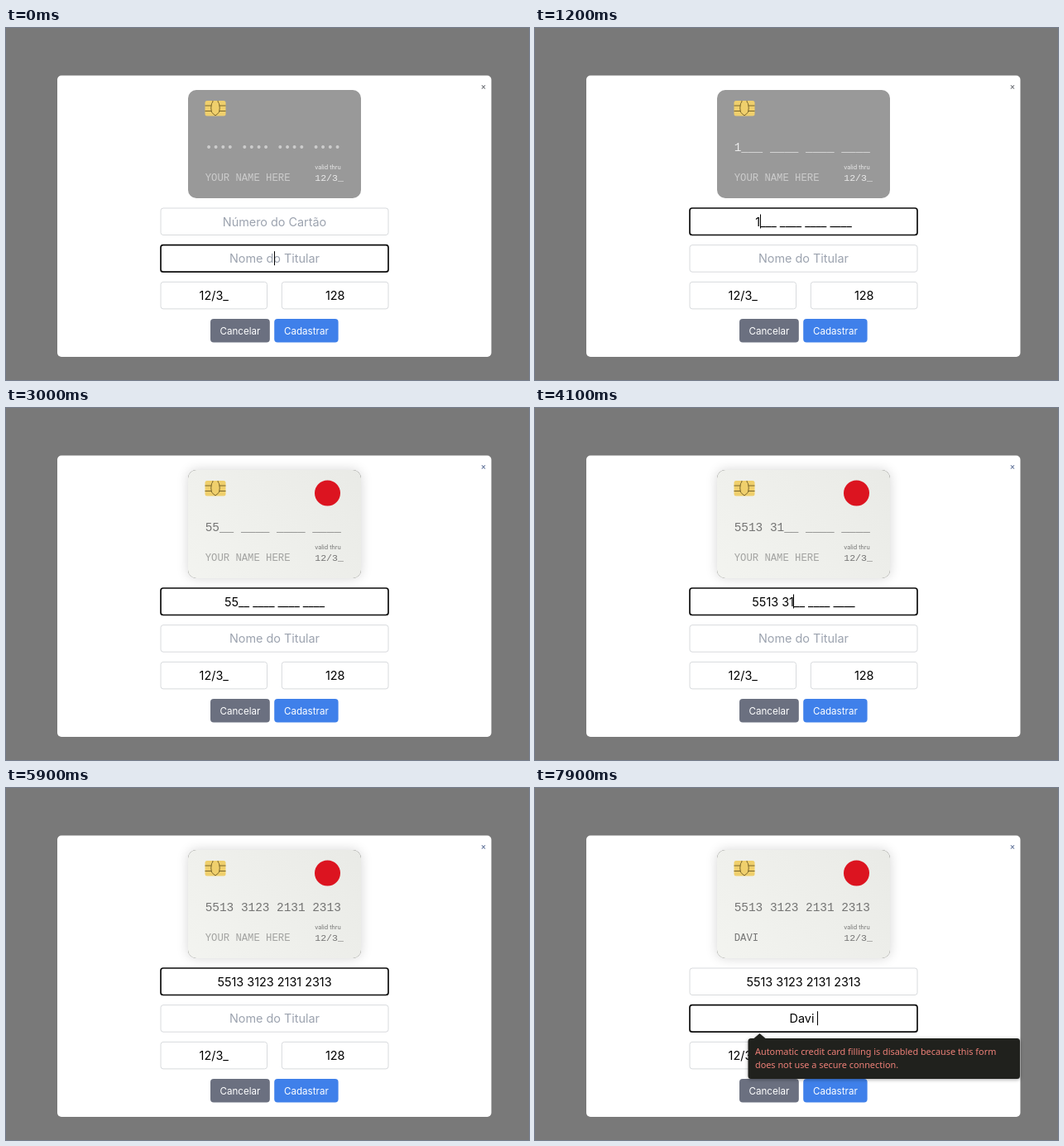
Recreate the animation shown at these times as an HTML page with a canvas. Size 632 px wide and 426 px high, loop 8 s.

```html
<!DOCTYPE html>
<html lang="pt">
<head>
<meta charset="utf-8">
<title>Cadastro de cartão</title>
<style>
  html, body { margin: 0; width: 100%; height: 100%; overflow: hidden; background: #797979; }
  canvas { display: block; }
</style>
</head>
<body>
<canvas id="stage" width="632" height="426"></canvas>
<script>
const ctx = document.getElementById('stage').getContext('2d');
const LOOP = 8000, STEP = 100, BLINK = 600;
const SANS = 'Inter, sans-serif';
const MONO = '"Liberation Mono", monospace';
const INPUT_FONT = '14.4px ' + SANS;
const CARD = { x: 220, y: 75, w: 209, h: 131, r: 10 };
const MASK = '____ ____ ____ ____';
const DIGITS = '5513312321312313';
const HOLDER = 'Davi ';

// [time, value]
const NUMBER_KEYS = [[300, ''], [1000, '1'], [1700, '']].concat(
  [[2200, 1], [2300, 2], [3200, 3], [3500, 4], [3900, 5], [4100, 6], [4300, 8], [4400, 9],
   [4700, 10], [4800, 12], [4900, 13], [5000, 14], [5100, 15], [5300, 16]]
    .map(([t, n]) => [t, DIGITS.slice(0, n)]));
const NAME_KEYS = [[6000, 0], [6800, 1], [7000, 2], [7100, 3], [7300, 4], [7800, 5]]
  .map(([t, n]) => [t, HOLDER.slice(0, n)]);
const BRAND_AT = 2320, BRAND_TIME = 500, POPUP_AT = 6900;

const lastKey = (keys, t) => keys.filter(k => k[0] <= t).pop();

function groups(digits) {
  return digits.replace(/(.{4})(?=.)/g, '$1 ');
}

function box(x, y, w, h, r) {
  ctx.beginPath();
  ctx.roundRect(x, y, w, h, r);
}

function fillBox(x, y, w, h, r, color) {
  box(x, y, w, h, r);
  ctx.fillStyle = color;
  ctx.fill();
}

function text(str, x, y, font, color, align = 'left') {
  ctx.font = font;
  ctx.fillStyle = color;
  ctx.textAlign = align;
  ctx.fillText(str, x, y);
}

function shadow(color, blur, y = 0) {
  ctx.shadowColor = color;
  ctx.shadowBlur = blur;
  ctx.shadowOffsetY = y;
}

function input(x, y, w, { value = '', placeholder = '', focused = false, caret = null }) {
  box(x, y, w, 32.5, 3);
  ctx.fillStyle = '#fff';
  ctx.fill();
  ctx.strokeStyle = focused ? '#0c0c0c' : '#d4d6da';
  ctx.lineWidth = focused ? 1.7 : 0.9;
  ctx.stroke();
  const mid = x + w / 2;
  ctx.font = INPUT_FONT;
  const left = mid - ctx.measureText(value).width / 2;
  if (value) text(value, left, y + 21.5, INPUT_FONT, '#000');
  else text(placeholder, mid, y + 21.5, INPUT_FONT, '#9ca3af', 'center');
  if (caret !== null) {
    const at = left + ctx.measureText(value.slice(0, caret)).width;
    ctx.fillStyle = '#000';
    ctx.fillRect(Math.floor(at), y + 7.5, 1, 17);
  }
}

function button(label, x, w, color) {
  fillBox(x, 352, w, 28.5, 4, color);
  text(label, x + w / 2, 370.5, '11.6px ' + SANS, '#fff', 'center');
}

function chip() {
  fillBox(240.5, 88, 25, 18.5, 2.5, '#efcf6c');
  ctx.strokeStyle = '#6d5a24';
  ctx.lineWidth = 0.9;
  ctx.beginPath();
  for (const side of [-1, 1]) {
    const edge = 253 + side * 12.5, inner = 253 + side * 5;
    for (const y of [94, 100.5]) {
      ctx.moveTo(edge, y);
      ctx.lineTo(inner, y);
    }
    ctx.moveTo(253 + side * 3, 88);
    ctx.quadraticCurveTo(253 + side * 3, 90, 253 + side * 4.5, 91.5);
    ctx.quadraticCurveTo(253 + side * 6, 97, 253 + side * 4.5, 102);
    ctx.quadraticCurveTo(253 + side * 2, 104.5, 253, 106);
  }
  ctx.stroke();
}

function cardBackground(t) {
  const { x, y, w, h, r } = CARD;
  if (t < BRAND_AT) return fillBox(x, y, w, h, r, '#999');

  ctx.save();
  shadow('rgba(0,0,0,.17)', 14);
  fillBox(x, y, w, h, r, '#82827e');
  shadow('transparent', 0);
  box(x, y, w, h, r);
  ctx.clip();
  const base = ctx.createLinearGradient(x + 72, y + h, x + 137, y);
  base.addColorStop(0, '#8a8a86');
  base.addColorStop(1, '#737470');
  ctx.fillStyle = base;
  ctx.fillRect(x, y, w, h);

  // A tilted sheet slides in from the left.
  const p = Math.min(1, (t - BRAND_AT) / BRAND_TIME);
  const left = -1.7 + 1.48 * (1 - Math.pow(1 - p, 1.75));
  ctx.translate(x + (left + 0.75) * w, y + 0.4 * h);
  ctx.rotate(25 * Math.PI / 180);
  const sheet = ctx.createLinearGradient(-60, h, 60, -h);
  sheet.addColorStop(0, '#f3f4f0');
  sheet.addColorStop(1, '#e8e9e5');
  ctx.fillStyle = sheet;
  ctx.fillRect(-0.75 * w, -h, 1.5 * w, 2 * h);
  ctx.restore();
}

function card(t, digits, name) {
  const branded = t >= BRAND_AT;
  const ink = alpha => branded ? `rgba(85,85,85,${alpha})` : `rgba(255,255,255,${alpha})`;
  cardBackground(t);
  chip();
  if (branded) {
    ctx.beginPath();
    ctx.arc(388.5, 103, 15.5, 0, 7);
    ctx.fillStyle = '#dc1420';
    ctx.fill();
  }
  const number = digits === null ? MASK.replace(/_/g, '•') : masked(digits);
  text(number, 240.7, 148.5, '14.4px ' + MONO, ink(digits === null ? 0.5 : 0.8));
  text(name.toUpperCase() || 'YOUR NAME HERE', 240.7, 184.5, '12.24px ' + MONO, ink(name ? 0.8 : 0.5));
  text('valid thru', 373.3, 170.8, '7.2px ' + SANS, ink(0.8));
  text('12/3_', 373.3, 184.5, '11.52px ' + MONO, ink(0.8));
}

function masked(digits) {
  const typed = groups(digits);
  return typed + MASK.slice(typed.length);
}

function popup() {
  ctx.save();
  shadow('rgba(0,0,0,.35)', 4, 1);
  ctx.beginPath();
  ctx.roundRect(257.5, 303, 328.5, 49, 3.5);
  ctx.moveTo(264, 303.5);
  ctx.lineTo(271.5, 297);
  ctx.lineTo(279, 303.5);
  ctx.fillStyle = '#20211d';
  ctx.fill();
  ctx.restore();
  const font = '10.87px "Noto Sans", sans-serif';
  text('Automatic credit card filling is disabled because this form', 266, 323.3, font, '#ee8078');
  text('does not use a secure connection.', 266, 339.3, font, '#ee8078');
}

function draw(t) {
  const numberKey = lastKey(NUMBER_KEYS, t);
  const nameKey = lastKey(NAME_KEYS, t);
  const digits = numberKey ? numberKey[1] : null;
  const name = nameKey ? nameKey[1] : '';
  const onNumber = Boolean(numberKey) && !nameKey;
  const lastInput = (nameKey || numberKey || [0])[0];
  const caretOn = Math.floor((t - lastInput) / BLINK) % 2 === 0;

  ctx.fillStyle = '#797979';
  ctx.fillRect(0, 0, 632, 426);
  fillBox(62, 57.5, 524.5, 340.5, 5, '#fff');
  text('×', 577, 74, '10.5px ' + SANS, t < 3000 ? '#5c5f66' : '#50658f', 'center');
  card(t, digits, name);

  input(187, 218, 275, {
    value: digits === null ? '' : masked(digits),
    placeholder: 'Número do Cartão',
    focused: onNumber,
    caret: onNumber && caretOn ? groups(digits).length : null
  });
  input(187, 262.7, 275, {
    value: name,
    placeholder: 'Nome do Titular',
    focused: !onNumber,
    caret: !onNumber && caretOn ? name.length : null
  });
  input(187, 307.4, 128.5, { value: '12/3_' });
  input(333.3, 307.4, 128.7, { value: '128' });
  button('Cancelar', 247, 71.8, '#6b7080');
  button('Cadastrar', 324.2, 77.4, '#3f80ea');
  if (t >= POPUP_AT) popup();
}

function tick() {
  const t = performance.now() % LOOP;
  draw(Math.floor(t / STEP) * STEP);
  requestAnimationFrame(tick);
}
tick();
</script>
</body>
</html>
```
